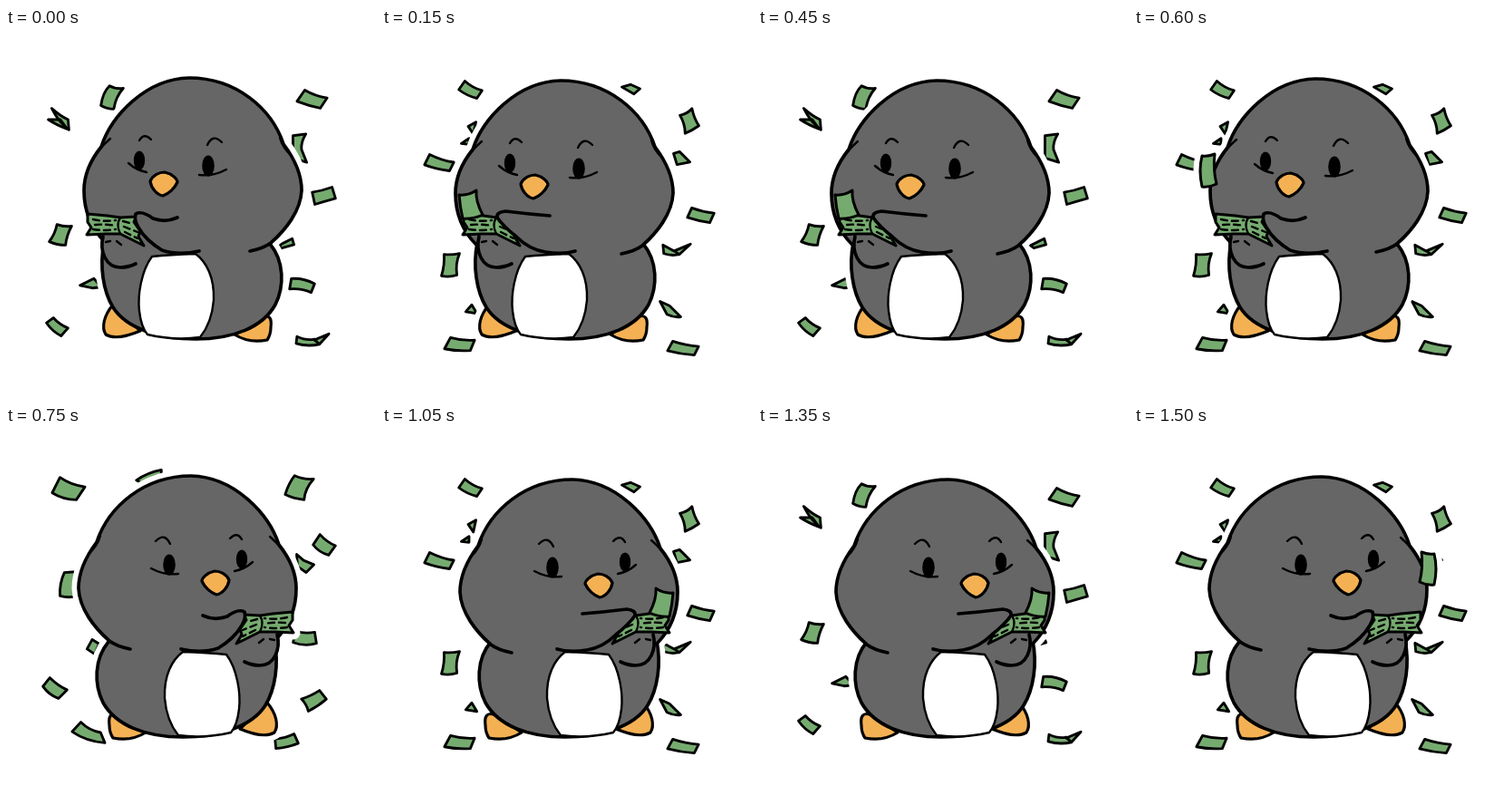
An HTML page for the animation above (1.65 s loop, 408 px wide and 408 px high).

```html
<!DOCTYPE html>
<html lang="en">
<head>
<meta charset="utf-8">
<title>Penguin tossing cash</title>
<style>
  html, body { margin: 0; width: 100%; height: 100%; overflow: hidden; background: #fff; }
  svg { display: block; width: 100vw; height: 100vh; }
  .ink { stroke: #000; stroke-width: 3.7; stroke-linecap: round; stroke-linejoin: round; }
  .thin { stroke-width: 2.4; }
  .bill { fill: #76ab70; stroke-width: 3; }
  .rain .bill { transform-box: fill-box; transform-origin: center; transform: scale(.95); }
  .line { fill: none; }
  .grey { fill: #666; }
  .orange { fill: #f4b154; stroke-width: 3.2; }
  .white { fill: #fff; }
  .halo path { fill: #fff; stroke: #fff; stroke-width: 15; stroke-linejoin: round; }
</style>
</head>
<body>
<svg id="stage" viewBox="0 0 408 408"></svg>
<script>
const STEP = 150;

// Three scatterings of falling bills, shown in turn.
const rain = {
  a: [
    'M114 63Q121 67 130 66Q121 76 119 90Q111 90 104 86Q106 71 114 63Z',
    'M50 88Q60 97 69 101L70 113Q58 104 50 88ZM46 101L60 101L68 112Q55 107 46 101Z',
    'M329 68Q341 75 355 77L347 89Q333 86 320 81Z',
    'M316 118L331 116Q325 126 326 134L332 149L316 144Z',
    'M337 181Q349 179 360 175L364 188Q353 191 340 195Z',
    'M56 216Q64 219 73 218Q67 229 66 240Q56 240 47 236Q54 227 56 216Z',
    'M300 240L316 232L318 239L304 243Z',
    'M81 284L97 276L106 286L95 287Z',
    'M314 276Q328 275 341 282L337 292Q326 287 312 288Z',
    'M44 325L52 319Q59 327 69 331L61 340Q51 335 44 325Z',
    'M320 340Q331 345 340 343L346 349Q332 352 319 348ZM340 344L357 337L346 349Z'
  ],
  b: [
    'M59 56Q72 65 88 67L78 82Q63 82 50 74Z',
    'M143 60Q156 51 172 48L172 54L150 64Z',
    'M318 54Q329 59 340 58Q330 69 329 82Q317 81 307 76Q311 63 318 54Z',
    'M346 119Q354 128 364 132L356 143Q345 140 338 131Z',
    'M320 141L328 148L340 153L331 162L321 155Z',
    'M64 161Q73 160 83 160Q74 174 79 188Q69 191 59 188Q58 174 64 161Z',
    'M318 226Q330 229 341 227L343 240Q330 244 316 239Z',
    'M95 235L103 240L98 252L89 246Z',
    'M48 277Q58 287 68 291L58 301Q47 297 40 287Z',
    'M325 301Q337 297 346 291L354 301Q345 309 333 315Q331 307 325 301Z',
    'M82 326Q92 336 105 338L110 350Q88 348 72 337Z',
    'M296 345Q308 344 318 339L323 350Q311 355 297 356Z'
  ],
  c: [
    'M91 58Q100 66 111 69L105 78Q93 75 84 68Z',
    'M264 65L274 62L285 67L278 73Z',
    'M328 96Q337 94 342 88Q344 99 350 108Q343 113 334 117Q334 106 328 96Z',
    'M95 108L104 103L101 117ZM87 128L96 122L96 129Z',
    'M52 139Q66 146 80 148L75 158Q59 156 46 151Z',
    'M321 138L328 136L340 148L325 151Z',
    'M341 198Q354 203 367 204L362 215Q348 213 336 209Z',
    'M309 239L322 246L328 250Q319 252 310 249ZM322 246L341 238L328 250Z',
    'M68 249Q77 250 86 248Q81 260 83 273Q74 276 65 274Q69 261 68 249Z',
    'M92 313L99 305L105 315Z',
    'M306 301L317 306L330 319Q322 320 314 316Z',
    'M75 341Q89 345 103 344L98 356Q83 357 68 354Z',
    'M320 345Q335 350 350 351L345 361Q329 360 314 356Z'
  ]
};

const shape = {
  head: 'M107 237C92 222 84 202 84 180C84 163 91 147 103 132C114 98 152 57 200 56C252 56 291 90 304 129C316 145 324 162 324 180C323 203 306 224 290 238Q282 244 267 247',
  body: 'M107 237C102 262 106 290 117 308C132 332 170 343 208 343C250 343 282 330 296 305C306 285 306 257 290 238',
  belly: 'M160 252C148 268 144 295 146 312Q148 330 155 338Q185 345 213 341Q226 325 228 300C229 275 220 258 208 249Q180 250 160 252Z',
  footL: 'M118 305C108 317 105 330 110 338Q122 345 148 334Z',
  footR: 'M283 318Q294 315 292 330Q292 338 288 344Q268 348 252 338Z',
  hand: 'M107 229C103 246 110 264 126 264Q135 264 143 260L146 228Z',
  cash: 'M90 205L112 207L126 209L144 208L141 214L148 224L146 230L152 240L140 234L126 227L110 227L89 228L94 220L90 214Z',
  rest: 'M189 209Q176 215 162 210Q150 201 143 205Q141 212 146 220Q154 234 172 245Q190 251 213 246',
  swipe: 'M185 207Q160 205 136 202Q126 203 127 209Q134 219 148 230Q162 244 180 247Q200 250 213 246',
  leaving: 'M104 179Q95 185 85 184Q86 197 89 210Q100 211 111 206Q103 191 104 179Z',
  flying: 'M75 141Q82 142 89 139Q87 156 91 172Q83 176 75 175Q71 157 75 141Z'
};

// Offsets are [x, y] for the left-facing drawing; flip mirrors them.
const pose = (flip, act, head, face, body) => ({ flip, act, head, face, body });
const poses = [
  pose(0, '', [2, -1], [2, -1], [1, 0]),
  pose(0, 'swipe', [-3, 2], [-4, 2], [-2, 0]),
  pose(0, 'toss', [0, 0], [0, 0], [0, 0]),
  pose(0, 'swipe', [-3, 2], [-4, 2], [-2, 0]),
  pose(0, 'toss', [0, 0], [0, 0], [0, 0]),
  pose(1, '', [2, -1], [3, 0], [3, 0]),
  pose(1, '', [-1, 0], [-1, 0], [0, 0]),
  pose(1, 'swipe', [-4, 3], [-5, 3], [-4, 0]),
  pose(1, 'toss', [-1, 0], [-1, 0], [0, 0]),
  pose(1, 'swipe', [-4, 3], [-5, 3], [-4, 0]),
  pose(1, 'toss', [-1, 0], [-1, 0], [0, 0])
];

const path = (d, cls = 'line') => `<path class="ink ${cls}" d="${d}"/>`;
const move = ([x, y], s) => `<g transform="translate(${x} ${y})">${s}</g>`;

// The eyes sit a little wider apart when the penguin faces right.
const face = gap =>
  move([-gap, 0], path('M145 125Q150 116 158 124M133 150Q142 158 153 160', 'line thin') +
    '<ellipse cx="145" cy="147" rx="6.2" ry="10.5"/>') +
  move([gap, 0], path('M220 130Q226 117 236 127M211 163Q226 165 241 157', 'line thin') +
    '<ellipse cx="221" cy="153" rx="6.8" ry="11.5"/>') +
  path('M157 170C160 163 167 160 173 160C182 162 187 168 187 171C184 178 177 184 171 186C164 185 158 177 157 170Z', 'orange');

const cash = path(shape.cash, 'bill thin') +
  `<g stroke-dasharray="7 5">${path('M96 211Q108 214 121 212M98 217Q110 216 121 218M96 222Q108 224 121 222M129 213L140 216M130 219L145 225M131 225L145 232', 'line thin')}</g>` +
  path('M126 209Q121 217 126 227', 'line thin');

function penguin(p) {
  const swiping = p.act === 'swipe', tossed = p.act === 'toss';
  const sil = d => `<path d="${d}"/>`;
  const halo = '<g class="halo">' +
    move(p.head, sil(shape.head)) + move(p.body, sil(shape.body)) +
    sil(shape.footL) + sil(shape.footR) + sil(shape.cash) +
    (tossed ? sil(shape.flying) : '') + '</g>';
  const s = halo +
    path(shape.footL, 'orange') + path(shape.footR, 'orange') +
    move(p.body, path(shape.body, 'grey') + path(shape.belly, 'white thin')) +
    move(p.head, path(shape.head, 'grey') +
      path('M92 149Q100 134 113 123M300 122Q303 133 312 141', 'line thin')) +
    move(p.face, face(p.flip * 2)) +
    `<path class="grey" d="${shape.hand}"/>` +
    path('M107 230C103 246 110 264 126 264Q135 264 143 260') +
    path('M110 236L115 235M122 235L127 239', 'line thin') +
    cash +
    (swiping ? path(shape.leaving, 'bill') : '') +
    path(swiping ? shape.swipe : shape.rest, 'grey') +
    (tossed ? path(shape.flying, 'bill') : '');
  return p.flip ? `<g transform="translate(406 0) scale(-1 1)">${s}</g>` : s;
}

const order = ['a', 'c', 'b'];
const bills = set => `<g class="rain">${rain[set].map(d => path(d, 'bill')).join('')}</g>`;
const stage = document.getElementById('stage');
stage.innerHTML = poses.map((p, i) =>
  `<g display="none">${bills(order[i % 3])}${penguin(p)}</g>`
).join('');

const cels = [...stage.children];
let shown = -1;
const start = performance.now();

function show(now) {
  const i = Math.floor(Math.max(0, now - start) / STEP) % cels.length;
  if (i !== shown) {
    if (shown >= 0) cels[shown].setAttribute('display', 'none');
    cels[i].setAttribute('display', 'inline');
    shown = i;
  }
}
function tick(now) {
  show(now);
  requestAnimationFrame(tick);
}
show(start);
requestAnimationFrame(tick);
</script>
</body>
</html>
```
